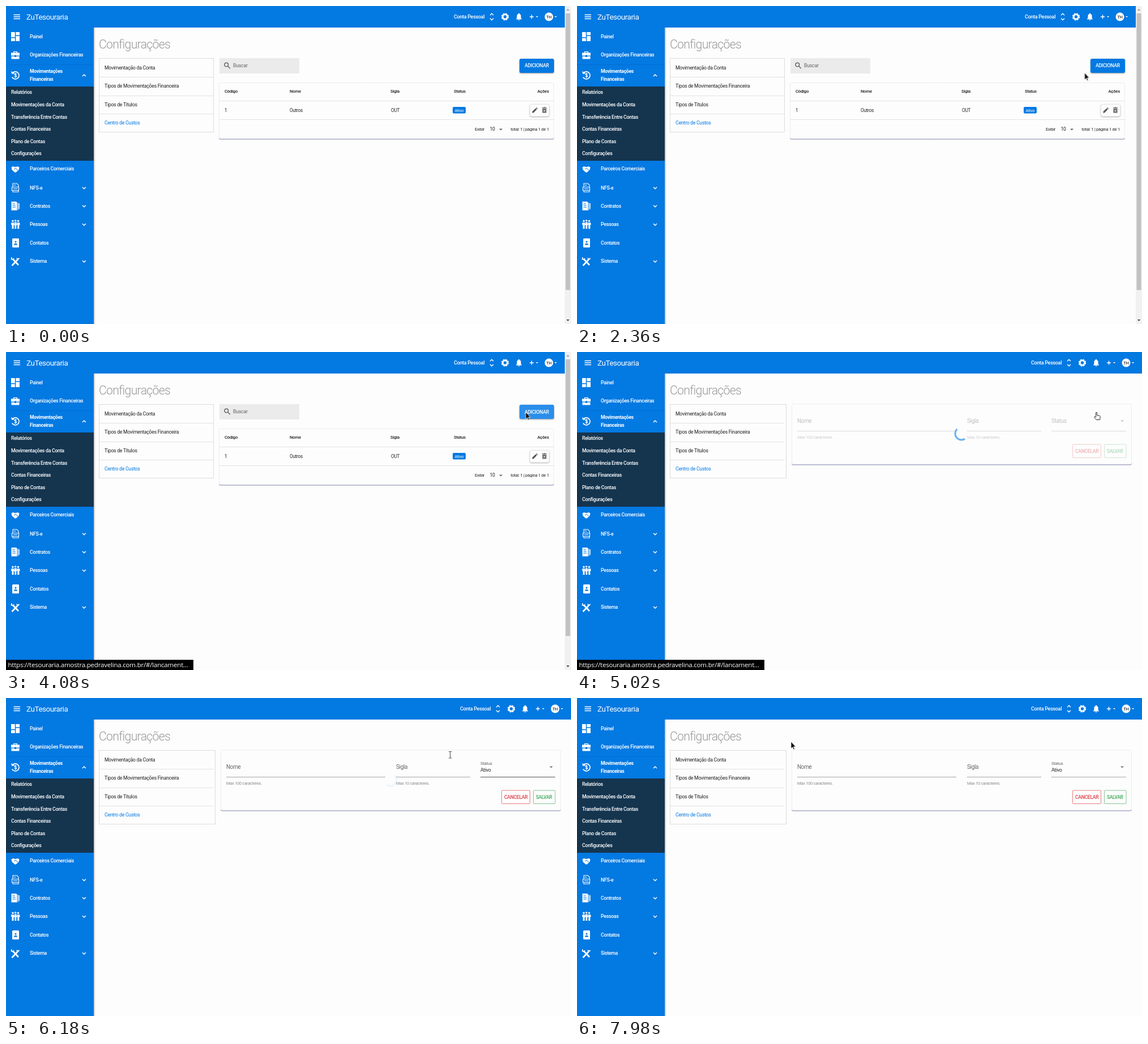
These frames come from a looping animation (998x561 px, 8 s). An HTML page:

```html
<!DOCTYPE html>
<html lang="pt-BR">
<head>
<meta charset="utf-8">
<title>Configurações</title>
<style>
html, body { margin: 0; width: 100%; height: 100%; overflow: hidden; background: #fdfdfd; }
svg { display: block; width: 998px; height: 561px; --blue: #0379e2; }
text { font: 8.8px Roboto, sans-serif; letter-spacing: -.035em; fill: #222; }
.mid { font-weight: 500; }
.end { text-anchor: end; }
.nav text, .top text { fill: #fff; }
.nav text { font-weight: 500; }
.nav .open { font-weight: 700; font-size: 8.6px; }
.top .brand { font-size: 13.5px; }
.top .acct { font-size: 9px; }
.title { font-size: 21.3px; font-weight: 300; fill: #999; }
.th text { font-size: 7.8px; font-weight: 500; }
.td text { font-size: 8.3px; }
.foot text { font-size: 7.6px; }
.form .label { font-size: 10px; fill: #666; }
.form .hint { font-size: 7.5px; fill: #888; }
.form .float { font-size: 7.7px; fill: #666; }
.url { font: 11.5px "Open Sans", sans-serif; letter-spacing: -.2px; fill: #fff; }
.blue { fill: var(--blue); }
.w { fill: #fff; }
.line { fill: none; stroke: #fff; stroke-width: 1.4; }
.thin { stroke-width: 1.1; }
.bold { stroke-width: 2.6; }
.rule { stroke: #e2e2e2; }
.card { fill: #fdfdfd; stroke: #ededf0; filter: drop-shadow(0 1px .6px #8a8cb0); }

.list, .editor, .right, .box, .cursor, .arrow, .hand, .beam, .press, .lit,
.status, .fields, .spin, .ring, .empty, .filled, .focus { animation: 8s linear infinite; }
.list { animation-name: list; animation-timing-function: step-end; }
.editor { animation-name: editor; animation-timing-function: step-end; }
.right { animation-name: right; animation-timing-function: step-end; }
.box { animation-name: box; animation-timing-function: step-end; }
.arrow { animation-name: arrow; animation-timing-function: step-end; }
.hand { animation-name: hand; animation-timing-function: step-end; }
.beam { animation-name: beam; animation-timing-function: step-end; }
.press { animation-name: press; animation-timing-function: step-end; }
.empty { animation-name: empty; animation-timing-function: step-end; }
.filled { animation-name: filled; animation-timing-function: step-end; }
.focus { animation-name: focus; }
.lit { animation-name: lit; }
.status { animation-name: status; }
.fields { animation-name: fields; }
.spin { animation-name: spin; }
.ring { animation-name: ring; transform-origin: 679px 144px; }
.cursor { animation-name: path; }

@keyframes list { 0% { visibility: visible } 54.5%, 100% { visibility: hidden } }
@keyframes editor { 0% { visibility: hidden } 54.5%, 100% { visibility: visible } }
@keyframes right { 0% { transform: none } 54.5%, 100% { transform: translateX(11px) } }
@keyframes box { 0% { width: 202px } 54.5%, 100% { width: 205px } }
@keyframes arrow {
  0% { opacity: 0 } 15.5% { opacity: 1 } 33.75% { opacity: 0 }
  47.5% { opacity: 1 } 54.5% { opacity: 0 } 80%, 100% { opacity: 1 }
}
@keyframes hand {
  0% { opacity: 0 } 33.75% { opacity: 1 } 47.5% { opacity: 0 }
  54.5% { opacity: 1 } 71.25%, 100% { opacity: 0 }
}
@keyframes beam { 0% { opacity: 0 } 71.25% { opacity: 1 } 80%, 100% { opacity: 0 } }
@keyframes press { 0% { transform: none } 48%, 100% { transform: translateY(1px) } }
@keyframes empty { 0% { opacity: 1 } 72.5%, 100% { opacity: 0 } }
@keyframes filled { 0% { opacity: 0 } 72.5%, 100% { opacity: 1 } }
@keyframes focus { 0%, 71.5% { opacity: 0 } 73%, 78% { opacity: 1 } 80%, 100% { opacity: 0 } }
@keyframes lit { 0%, 43% { fill: var(--blue) } 45%, 100% { fill: #2a8eea } }
@keyframes status { 0%, 47.9% { opacity: 0 } 48.2%, 64% { opacity: 1 } 66.5%, 100% { opacity: 0 } }
@keyframes fields { 0%, 69% { opacity: .4 } 72.5%, 100% { opacity: 1 } }
@keyframes spin { 0%, 69.5% { opacity: 1 } 74% { opacity: .2 } 77.25% { opacity: .1 } 78.5%, 100% { opacity: 0 } }
@keyframes ring { from { transform: rotate(6deg) } to { transform: rotate(1806deg) } }
@keyframes path {
  0%, 15.5% { transform: translate(976px, 306px) }
  22.75% { transform: translate(881px, 154px) }
  25% { transform: translate(879px, 128px) }
  35.25% { transform: translate(919px, 105px) }
  38.25% { transform: translate(920px, 104px) }
  51%, 62.5% { transform: translate(918px, 106px) }
  68% { transform: translate(907px, 105px) }
  71.25% { transform: translate(880px, 104px) }
  77.25% { transform: translate(785px, 100px) }
  87.75% { transform: translate(503px, 85px) }
  93.75% { transform: translate(430px, 62px) }
  98.25% { transform: translate(385px, 76px) }
  99.75%, 100% { transform: translate(378px, 77px) }
}
</style>
</head>
<body>
<svg viewBox="0 0 998 561">
  <defs>
    <linearGradient id="side"><stop stop-color="#000" stop-opacity=".25"/><stop offset="1" stop-color="#000" stop-opacity="0"/></linearGradient>
    <path id="down" d="M-3-1.6 0 1.5 3-1.6" class="line"/>
    <path id="caret" d="M-3-1.5H3L0 1.5Z"/>
  </defs>

  <text class="title" x="164" y="75">Configurações</text>

  <!-- settings menu -->
  <rect class="box" x="164.5" y="92.5" width="202" height="130" fill="#fdfdfd" stroke="#dddcd8"/>
  <path class="rule" d="M165 125.5H366M165 158.5H366M165 190.5H366"/>
  <text x="174" y="111.5">Movimentação da Conta</text>
  <text x="174" y="144">Tipos de Movimentações Financeira</text>
  <text x="174" y="177">Tipos de Títulos</text>
  <text x="174" y="209" style="fill:var(--blue)">Centro de Custos</text>

  <!-- record list -->
  <g class="list">
    <rect x="377" y="92" width="141" height="27" fill="#ebebeb"/>
    <g fill="none" stroke="#666" stroke-width="1.5"><circle cx="389.3" cy="103.5" r="3.3"/><path d="m391.8 106 4 4.2"/></g>
    <text x="401" y="108.3" style="font-size:8.9px;fill:#666">Buscar</text>

    <rect class="lit" x="907" y="93" width="61" height="25" rx="3" style="filter:drop-shadow(0 1.5px 1.3px #0006)"/>
    <text class="press mid" x="916" y="108.3" style="fill:#fff;font-size:8.7px">ADICIONAR</text>

    <rect class="card" x="376.5" y="135.5" width="591" height="98.5" rx="2"/>
    <path class="rule" d="M377 167.5H968M377 200.5H968"/>
    <g class="th">
      <text x="386" y="153">Código</text><text x="501" y="153">Nome</text>
      <text x="679" y="153">Sigla</text><text x="791" y="153">Status</text>
      <text class="end" x="959" y="153">Ações</text>
    </g>
    <g class="td">
      <text x="386" y="187">1</text><text x="501" y="187">Outros</text><text x="680" y="187">OUT</text>
    </g>
    <rect class="blue" x="789" y="178" width="23" height="11.5" rx="2"/>
    <text x="792.5" y="186.7" style="fill:#fff;font-size:7.6px">Ativo</text>
    <rect x="925.5" y="173.5" width="34" height="21" rx="3" fill="#fdfdfd" stroke="#e4e4e4" style="filter:drop-shadow(0 1px 1px #0004)"/>
    <path d="M929.5 188.5v-2.2l5.9-5.9 2.2 2.2-5.9 5.9ZM936 179.8l1-1 2.2 2.2-1 1Z" fill="#555"/>
    <path d="M947 179h2.5l.6-.7h2.2l.6.7h2.2v1.2H947ZM947.5 181h7v7.5h-7Z" fill="#666"/>
    <path d="m949.4 183 3.2 3.5m0-3.5-3.2 3.5" stroke="#fff" stroke-width=".9"/>
    <g class="foot">
      <text x="828" y="220">Exibir</text>
      <text x="854.5" y="220" style="font-size:8.6px">10</text>
      <text class="end" x="959" y="220">total: 1 | página 1 de 1</text>
    </g>
    <use href="#caret" x="874" y="218" fill="#666"/>
  </g>

  <!-- record form -->
  <g class="editor form">
    <rect class="card" x="379.5" y="92" width="600" height="106" rx="2"/>
    <g class="fields">
      <path d="M389 139.5H670M689 139.5H820M838 139.5H970" stroke="#a6a6a6"/>
      <path class="focus" d="M838 139.5H970" stroke="#555"/>
      <text class="label" x="389" y="125">Nome</text>
      <text class="label" x="689" y="125">Sigla</text>
      <text class="hint" x="389" y="153">Max 100 caracteres.</text>
      <text class="hint" x="689" y="153">Max 10 caracteres.</text>
      <text class="label empty" x="838" y="125">Status</text>
      <g class="filled">
        <text class="float" x="838" y="117.5">Status</text>
        <text x="838" y="129.8">Ativo</text>
      </g>
      <use href="#caret" x="963" y="122" fill="#777"/>
      <g fill="none">
        <rect x="875.5" y="163" width="50" height="23.5" rx="1" stroke="#e87c7c"/>
        <rect x="931.5" y="163" width="38.5" height="23.5" rx="1" stroke="#80c494"/>
      </g>
      <text class="mid" x="880" y="178" style="font-size:8.6px;fill:#dd4048">CANCELAR</text>
      <text class="mid" x="936" y="178" style="font-size:8.4px;fill:#3aa858">SALVAR</text>
    </g>
    <g class="spin"><circle class="ring" cx="679" cy="144" r="11" fill="none" stroke="#62aef0" stroke-width="3" stroke-dasharray="32.6 40"/></g>
  </g>

  <!-- side navigation -->
  <rect x="155" y="38" width="3" height="523" fill="url(#side)"/>
  <rect class="blue" y="38" width="155" height="523"/>
  <path d="M0 103.5H154" stroke="#006fd2"/>
  <rect y="142" width="155" height="131" fill="#15354f"/>
  <g class="nav">
    <text x="42" y="57">Painel</text>
    <text x="42" y="89">Organizações Financeiras</text>
    <text class="open" x="42" y="118">Movimentações</text>
    <text class="open" x="42" y="132">Financeiras</text>
    <text x="9" y="155">Relatórios</text>
    <text x="9" y="177">Movimentações da Conta</text>
    <text x="9" y="199">Transferência Entre Contas</text>
    <text x="9" y="220">Contas Financeiras</text>
    <text x="9" y="242">Plano de Contas</text>
    <text x="9" y="263">Configurações</text>
    <text x="42" y="290">Parceiros Comerciais</text>
    <text x="42" y="323.5">NFS-e</text>
    <text x="42" y="355.5">Contratos</text>
    <text x="42" y="388">Pessoas</text>
    <text x="42" y="420.5">Contatos</text>
    <text x="42" y="453">Sistema</text>
  </g>
  <path d="M135 124.1 138 121l3 3.1" class="line"/>
  <use href="#down" x="138" y="321"/><use href="#down" x="138" y="353"/>
  <use href="#down" x="138" y="385.5"/><use href="#down" x="138" y="450.5"/>

  <g class="w">
    <path d="M9 46h6.8v9H9ZM17.3 46H24v5.5h-6.7ZM9 56.5h6.8V62H9ZM17.3 53H24v9h-6.7Z"/>
    <path d="M9 82.5h4V80h7v2.5h4v5h-6V86.5h-3v1H9ZM14.3 82.5h4.4v-1.3h-4.4ZM9.5 88.7h5.3v1.3h3.4v-1.3h5.3V93.5h-14Z" fill-rule="evenodd"/>
    <path d="m9.5 284.5 2.5-1.5 4.500 1 4.500-1 2.500 1.500-1 4.500-5 4.500h-2l-5-4.500Z"/>
    <path d="M9.5 345h8.500l1.500 1.500v14h-10ZM20.300 347h1v12l-1 1.500ZM22.200 348h1.500v9l-.8 2.500-.7-2.500Z"/>
    <circle cx="12" cy="379.3" r="1.7"/><circle cx="16.7" cy="378.6" r="1.7"/><circle cx="21.5" cy="379.3" r="1.7"/>
    <path d="M9.5 382h4.3l.7 4-1 .5v6.5h-3v-6.5l-1.5-.8ZM15 381.3h3.5l.7 5.5-1 .3v6h-2.800v-6l-1-.3ZM19.7 382H24l.8 3.7-1.5.8v6.5h-3v-6.5l-1-.5Z"/>
    <rect x="11" y="410" width="12" height="16" rx="1.5"/>
  </g>
  <path d="M11.5 349h4.500M11.5 352h5.500M11.5 355h5.500M14 288l3-2 4 4" stroke="#0379e2" fill="none"/>
  <g class="blue"><circle cx="17" cy="416" r="1.6"/><path d="M14 421.500q0-2.800 3-2.800t3 2.800Z"/></g>
  <g class="line">
    <path d="M11.3 118.5a6.5 6.5 0 1 1-.5 7M10 115.5l1 3.5 3.5-.5" style="stroke-width:1.7"/>
    <path class="thin" d="M18.800 120.3q-2-1.6-3.6-.4-1 1.6 1.5 2.3 2.8.8 1.6 2.5-1.6 1.2-3.6-.3M16.8 118v8.8"/>
    <path class="thin" d="M12 319v-6h7l3 3v3M10.5 319.5h12v6h-12ZM12 326v2h10v-2M13.5 316h4M12.5 322.5h8"/>
    <path class="bold" d="m12 446.5 10 10.5M20 448l-9.5 10"/>
    <path d="M10 443.5l-.3 3 2.8.9 1.5-2M23.5 445l-3.2 2.8-1-3.3" style="stroke-width:1.9"/>
  </g>

  <!-- top bar -->
  <rect class="blue" width="998" height="38"/>
  <g class="top">
    <path d="M13.5 15.500h11.5M13.5 19h11.5M13.5 22.5h11.5" class="line"/>
    <text class="brand" x="36" y="24">ZuTesouraria</text>
    <g class="right">
      <text class="acct mid" x="791" y="21.5">Conta Pessoal</text>
      <path d="m855 16.3 3-3 3 3M855 21.700l3 3 3-3" class="line"/>
      <circle cx="881.5" cy="19" r="5.7" fill="none" stroke="#fff" stroke-width="1.9" stroke-dasharray="3 1.477"/>
      <circle cx="881.5" cy="19" r="4" class="line bold"/>
      <path class="w" d="M901.2 23.5v-1l1.2-1.3v-3.3q0-3.2 2.7-3.9v-1.3h1.8V14q2.7.7 2.7 3.9v3.3l1.2 1.3v1ZM904.5 24.3h3q-.4 1.3-1.500 1.3t-1.500-1.3Z"/>
      <path d="M925 19h7M928.5 15.5v7" class="line"/>
      <path class="w" d="M936 18h4l-2 2.3ZM969 18h4l-2 2.3Z"/>
      <circle class="w" cx="959" cy="19" r="7.5"/>
      <text class="mid" x="959" y="21.7" text-anchor="middle" style="font-size:7.5px;fill:#333">TH</text>
    </g>
  </g>

  <g class="list">
    <rect x="987" width="11" height="561" fill="#f1f1f1"/>
    <rect x="988.5" y="13" width="8" height="488" fill="#c1c1c1"/>
    <path d="m989.8 8 2.7-3 2.7 3Z" fill="#999"/>
    <path d="m989.8 553 2.7 3 2.7-3Z" fill="#444"/>
  </g>

  <g class="status">
    <rect y="543" width="331" height="18"/>
    <text class="url" x="3.5" y="556">https://tesouraria.amostra.pedravelina.com.br/#/lancament…</text>
  </g>

  <g class="cursor">
    <path class="arrow" d="M0 0V12.2L2.800 9.7 4.6 14 6.4 13.2 4.6 9H8.3Z" fill="#111" stroke="#fff" stroke-width=".7"/>
    <path class="hand" d="M-1 1q1-1.5 2 0v4.5l4.6.9q1.3.4 1.1 2L6 13.5H-.3L-3.7 9.2q-.2-1.5 1.2-1.3L-1 9Z" fill="#fff" stroke="#222"/>
    <path class="beam" d="M-2.5-5.5H-.8L0-4.8.8-5.5H2.5M0-4.8V5.3M-2.5 6H-.8L0 5.3.8 6H2.5" fill="none" stroke="#333"/>
  </g>
</svg>
</body>
</html>
```
